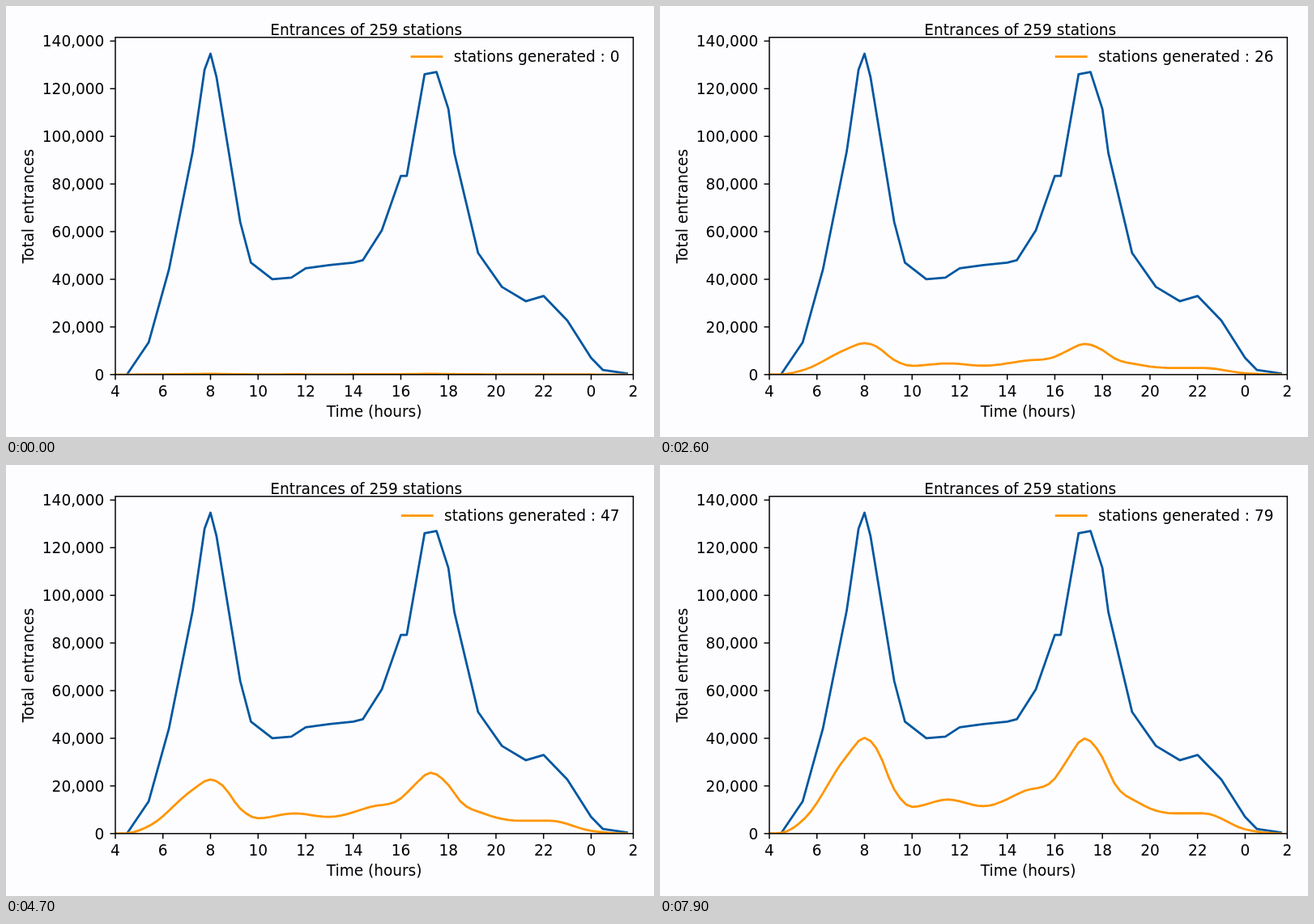
Animation, 800 px wide and 533 px high, one loop 8 s. Source, as an HTML page with a canvas:

```html
<!DOCTYPE html>
<html lang="en">
<head>
<meta charset="utf-8">
<title>Entrances of 259 stations</title>
<style>
html, body { margin: 0; width: 100%; height: 100%; overflow: hidden; background: #fdfdff; }
canvas { display: block; }
</style>
</head>
<body>
<canvas id="chart" width="800" height="533"></canvas>
<script>
const ctx = document.getElementById('chart').getContext('2d');
const LOOP = 8000, STEP = 100;
const BLUE = '#0057a0', ORANGE = '#ff9500', INK = '#000', PAPER = '#fdfdff';
const EM = 18.52, LINE = 2.78, THIN = 1.48, TICK = 6.5;
const box = { left: 135, right: 774.4, top: 38.8, bottom: 455.8 };
const HOUR = 29.37, THOUSAND = 2.946;  // pixels per hour, per 1000 entrances

const xAt = hour => box.left + (hour - 4) * HOUR;
const yAt = value => box.bottom - value * THOUSAND;

// Key points: [hour, thousands of entrances].
const total = [
  [4.5, 0.2], [5.4, 13.5], [6.25, 44], [7.25, 93.5], [7.75, 128], [8, 134.7],
  [8.25, 125], [9.25, 64], [9.7, 47], [10.6, 40], [11.4, 40.7], [12, 44.6],
  [13, 46], [14, 47], [14.4, 48], [15.2, 60.5], [16, 83.4], [16.25, 83.4],
  [17, 126.1], [17.5, 127], [18, 111.5], [18.25, 93], [19.25, 51],
  [20.25, 36.8], [21.25, 30.8], [22, 33], [23, 22.7], [24, 7], [24.5, 1.9], [25.5, 0.5]
];
const generated = [
  [4, 0.1], [4.75, 1], [5.5, 6.5], [7.25, 32.5], [8, 40.2], [8.5, 35.8], [9.25, 18.5],
  [10, 11.2], [11.5, 14.3], [13, 11.5], [14.75, 18], [16, 23.1], [16.5, 30.6],
  [17.25, 39.9], [18, 31.9], [18.5, 21.2], [19.5, 13.1], [21, 8.5], [22.25, 8.5],
  [24, 1.8], [25.5, 0.1]
];

// Share of the full curve reached: [station count, share].
const morning = [[0, 0.007], [19, 0.231], [33, 0.428], [47, 0.565], [58, 0.668], [67, 0.795], [79, 1]];
const evening = [[0, 0.007], [19, 0.226], [33, 0.42], [47, 0.64], [58, 0.707], [67, 0.785], [79, 1]];

const clamp = v => Math.max(0, Math.min(1, v));

function slope(points, i) {
  if (i === 0 || i === points.length - 1) return 0;
  const [[x0, y0], [x1, y1], [x2, y2]] = points.slice(i - 1, i + 2);
  const a = (y1 - y0) / (x1 - x0), b = (y2 - y1) / (x2 - x1);
  return a * b <= 0 ? 0 : (a * (x2 - x1) + b * (x1 - x0)) / (x2 - x0);
}

// Value at x, along straight segments or a spline that stays flat at its peaks.
function sample(points, x, smooth) {
  const i = Math.max(1, points.findIndex(p => p[0] >= x));
  const [x0, y0] = points[i - 1], [x1, y1] = points[i];
  const w = x1 - x0, t = (x - x0) / w, s = 1 - t;
  if (!smooth) return y0 * s + y1 * t;
  return y0 * s * s * (1 + 2 * t) + y1 * t * t * (1 + 2 * s)
    + w * s * t * (s * slope(points, i - 1) - t * slope(points, i));
}

function text(str, x, y, align) {
  ctx.fillStyle = INK;
  ctx.textAlign = align;
  ctx.fillText(str, x, y);
}

function segment(x1, y1, x2, y2) {
  ctx.beginPath();
  ctx.moveTo(x1, y1);
  ctx.lineTo(x2, y2);
  ctx.stroke();
}

function curve(points, color) {
  ctx.beginPath();
  for (const [hour, value] of points) ctx.lineTo(xAt(hour), yAt(value));
  ctx.strokeStyle = color;
  ctx.stroke();
}

function grown(count) {
  const early = sample(morning, count), late = sample(evening, count);
  const points = [];
  for (let hour = 4; hour <= 25.5; hour += 0.25) {
    const share = early + (late - early) * clamp((hour - 9) / 7);
    points.push([hour, share * sample(generated, hour, true)]);
  }
  return points;
}

function drawCurves(count) {
  ctx.save();
  ctx.beginPath();
  ctx.rect(box.left, box.top, box.right - box.left, box.bottom - box.top);
  ctx.clip();
  ctx.lineWidth = LINE;
  ctx.lineCap = 'square';
  ctx.lineJoin = 'round';
  curve(total, BLUE);
  curve(grown(count), ORANGE);
  ctx.restore();
}

function drawAxes() {
  ctx.strokeStyle = INK;
  ctx.lineWidth = THIN;
  ctx.lineCap = 'butt';
  ctx.strokeRect(box.left, box.top, box.right - box.left, box.bottom - box.top);
  for (let hour = 4; hour <= 26; hour += 2) {
    const x = Math.min(xAt(hour), box.right);
    segment(x, box.bottom, x, box.bottom + TICK);
    text(String(hour % 24), x, 482.5, 'center');
  }
  for (let value = 0; value <= 140; value += 20) {
    const y = yAt(value);
    segment(box.left - TICK, y, box.left, y);
    text((value * 1000).toLocaleString('en-US'), 121.4, y + 6.8, 'right');
  }
}

function drawLabels() {
  text('Entrances of 259 stations', 444.7, 35.5, 'center');
  text('Time (hours)', 454.6, 507.8, 'center');
  ctx.save();
  ctx.translate(33.6, 247.6);
  ctx.rotate(-Math.PI / 2);
  text('Total entrances', 0, 0, 'center');
  ctx.restore();
}

function drawLegend(count) {
  const label = 'stations generated : ' + count;
  const x = 757.5 - ctx.measureText(label).width;
  text(label, x, 69.4, 'left');
  ctx.strokeStyle = ORANGE;
  ctx.lineWidth = LINE;
  ctx.lineCap = 'square';
  segment(x - 2.8 * EM, 62.7, x - 0.8 * EM, 62.7);
}

function draw(count) {
  ctx.fillStyle = PAPER;
  ctx.fillRect(0, 0, 800, 533);
  ctx.font = EM + 'px "DejaVu Sans", sans-serif';
  drawCurves(count);
  drawAxes();
  drawLabels();
  drawLegend(count);
}

function tick() {
  draw(Math.floor((performance.now() % LOOP) / STEP));
  requestAnimationFrame(tick);
}
tick();
</script>
</body>
</html>
```
